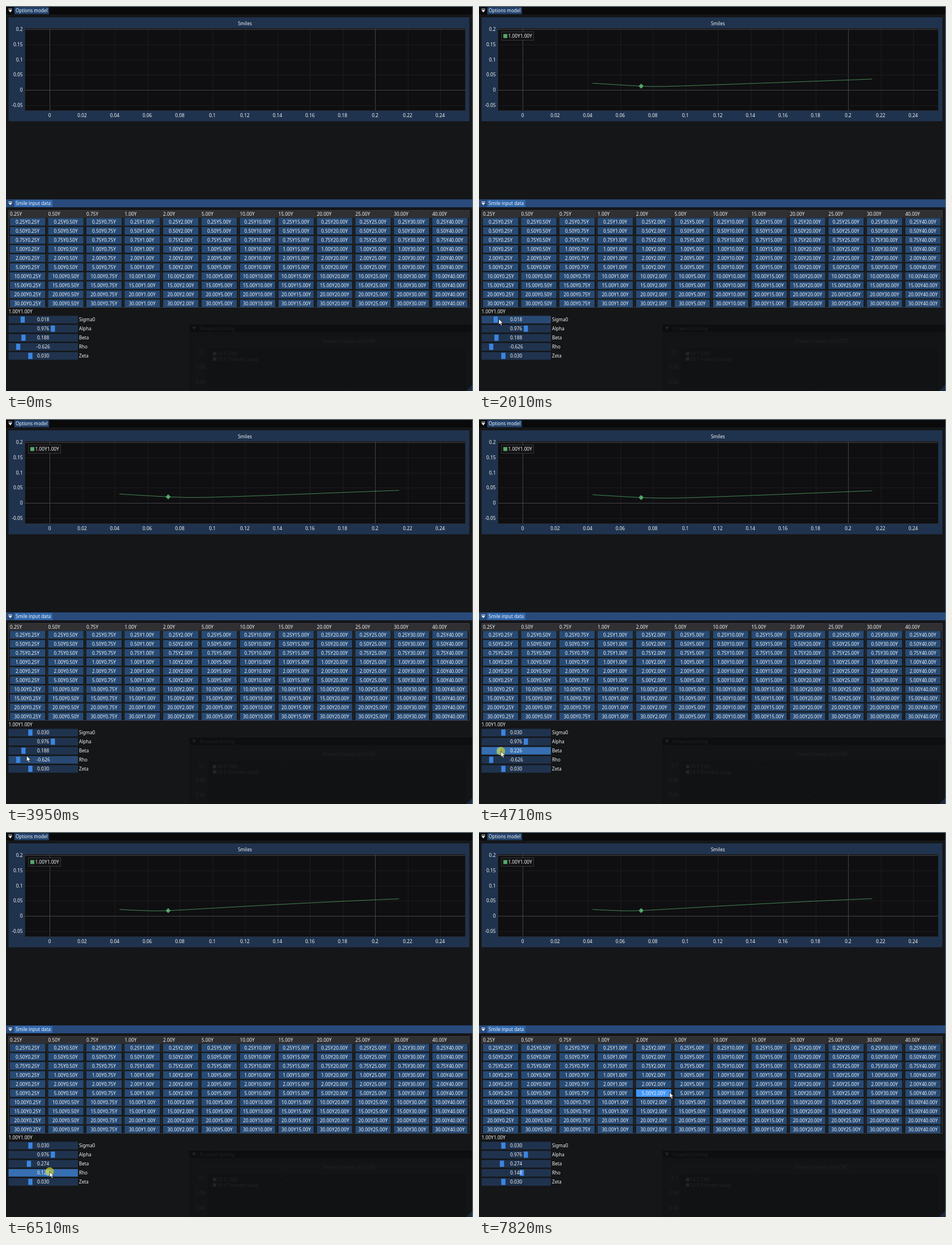
Recreate the animation shown at these times as an HTML page with a canvas. Size 825 by 679 pixels, loop 8 s.

```html
<!DOCTYPE html>
<html lang="en">
<head>
<meta charset="utf-8">
<title>Options model</title>
<style>
html, body { margin: 0; width: 100%; height: 100%; overflow: hidden; background: #151618; }
canvas { display: block; width: 825px; height: 679px; }
</style>
</head>
<body>
<canvas id="stage" width="825" height="679"></canvas>
<script>
const ctx = document.getElementById('stage').getContext('2d');
const LOOP = 8000, STEP = 70;
const TENORS = ['0.25', '0.50', '0.75', '1.00', '2.00', '5.00', '10.00', '15.00', '20.00', '25.00', '30.00', '40.00'];
const EXPIRIES = TENORS.filter(n => n !== '25.00' && n !== '40.00');
const WHITE = '#f2f3f4', GREEN = '#55a868', FRAME = '#20334e';
const ROW = 16, CELL_W = 62.3, BAR_H = 13.4;

// The screen refreshes every STEP ms, counted from each of these times.
const STARTS = [0, 120, 2230, 3460, 5120, 5950, 7200];

// Slider value = (thumb x - zero) / scale; press..release is its drag.
const SLIDERS = [
  { name: 'Sigma0', init: 0.018, zero: 9.2, scale: 1128, press: 2230, release: 3460 },
  { name: 'Alpha', init: 0.976, zero: 9.2, scale: 75.4 },
  { name: 'Beta', init: 0.188, zero: 9.6, scale: 113, press: 4300, release: 5120 },
  { name: 'Rho', init: -0.626, zero: 65.4, scale: 70, press: 5740, release: 7200 },
  { name: 'Zeta', init: 0.03, zero: 9.2, scale: 1128 }
];
const [SIGMA, , BETA, RHO] = SLIDERS;
const CLICK = { press: 1310, release: 1450 };

const mix = (a, b, k) => a + (b - a) * k;
const mixAll = (a, b, k) => a.map((v, i) => mix(v, b[i], k));
const smooth = k => k * k * (3 - 2 * k);
const easeOut = k => 1 - (1 - k) ** 2;
const within = (t, r, delay = 0) => t >= r.press + delay && t < r.release;
const thumbX = (s, value) => s.zero + value * s.scale;

// Pointer moves: begin, end, x, y, easing
const ENTRY = [753, 671];
const MOVES = [
  [120, 960, 250, 428, easeOut],
  [1450, 1730, 40, 557, smooth],
  [1800, 2010, 35, 552, smooth],
  [2230, 2990, thumbX(SIGMA, 0.03), 555, smooth],
  [3460, 3880, 37, 595, smooth],
  [3880, 4230, thumbX(BETA, 0.188), 586, smooth],
  [4455, 4727, thumbX(BETA, 0.274), 586, smooth],
  [5190, 5600, thumbX(RHO, -0.626), 600, smooth],
  [5750, 6571, 78, 599, smooth],
  [6650, 6930, thumbX(RHO, 0.148), 598, smooth],
  [7200, 7760, 336.5, 459, smooth]
];

// Smile shapes: left slope, right slope, centre, roundness, base height, bow
const SMILES = {
  low: [0.066, 0.0365, 305, 25, 143.2, 0],
  sigma: [0.067, 0.0395, 320, 45, 140.7, 0],
  beta: [0.067, 0.041, 314, 41, 143.1, 0],
  rho: [0.06, 0.0535, 262, 30, 140.7, 5]
};

function snap(t) {
  const s = STARTS.filter(v => v <= t).pop();
  return s ? s + Math.floor((t - s) / STEP) * STEP : 0;
}

function pointer(t) {
  if (t < MOVES[0][0]) return null;
  let pos = ENTRY;
  for (const [begin, end, x, y, ease] of MOVES) {
    if (t < begin) break;
    pos = mixAll(pos, [x, y], ease(Math.min(1, (t - begin) / (end - begin))));
  }
  return pos;
}

function sliderValue(s, t) {
  if (!s.press || t < s.press + STEP) return s.init;
  return (pointer(Math.min(t, s.release) - STEP)[0] - s.zero) / s.scale;
}

function box(x, y, w, h, fill) {
  ctx.fillStyle = fill;
  ctx.fillRect(x, y, w, h);
}

function outline(x, y, w, h, color) {
  ctx.strokeStyle = color;
  ctx.lineWidth = 1;
  ctx.strokeRect(x, y, w, h);
}

function poly(points, fill) {
  ctx.beginPath();
  points.forEach(p => ctx.lineTo(p[0], p[1]));
  ctx.closePath();
  ctx.fillStyle = fill;
  ctx.fill();
}

function text(str, x, y, align = 'left', color = WHITE) {
  const size = /^[-\d]/.test(str) ? 8.3 : 8.15;
  ctx.font = size + 'px "Noto Sans", "Open Sans", sans-serif';
  ctx.textAlign = align;
  ctx.fillStyle = color;
  ctx.fillText(str, x, y + 3);
}

function titleBar(y, label, width, bar, tab) {
  box(0, y, 824, 14, bar);
  ctx.beginPath();
  ctx.roundRect(14.5, y + 1, width, 12.5, [2, 2, 0, 0]);
  ctx.fillStyle = tab;
  ctx.fill();
  box(4.2, y + 3.8, 6.8, 1, WHITE);
  poly([[4.2, y + 6], [11, y + 6], [7.6, y + 10.3]], WHITE);
  text(label, 17, y + 7.3);
}

function drawPlot() {
  box(4.5, 20, 814, 183.3, FRAME);
  text('Smiles', 422, 31, 'center');
  box(33, 39.5, 779, 145, '#0f0f11');
  for (let i = 0; i <= 12; i++) {
    const x = 77 + i * 57.5;
    box(Math.round(x), 40, 1, 144, i % 10 ? '#1c1c1e' : '#454547');
    text(String(+(i * 0.02).toFixed(2)), x, 193, 'center');
  }
  for (let i = -1; i <= 4; i++) {
    const y = 148 - i * 26.75;
    box(33, Math.round(y), 779, 1, i % 4 ? '#1c1c1e' : '#454547');
    text(String(+(i * 0.05).toFixed(2)), 29.5, y, 'right');
  }
  outline(33.5, 39.5, 778, 145, '#25272c');
}

function drawSmile(t) {
  let p = mixAll(SMILES.low, SMILES.sigma, (sliderValue(SIGMA, t) - 0.018) / 0.012);
  p = mixAll(p, SMILES.beta, (sliderValue(BETA, t) - 0.188) / 0.086);
  p = mixAll(p, SMILES.rho, (sliderValue(RHO, t) + 0.626) / 0.774);
  const [l, r, m, s, base, bow] = p;
  const markX = 286.5, endX = 694.5;
  const height = x => {
    const w = Math.max(0, (x - markX) / (endX - markX));
    return base - (r - l) / 2 * (x - m) - (r + l) / 2 * Math.hypot(x - m, s) - bow * w * (1 - w);
  };

  ctx.beginPath();
  for (let x = 200.5; x <= endX; x += 6.5) ctx.lineTo(x, height(x));
  ctx.strokeStyle = GREEN;
  ctx.lineWidth = 0.8;
  ctx.stroke();
  const y = height(markX), d = 4.4;
  poly([[markX - d, y], [markX, y - d], [markX + d, y], [markX, y + d]], GREEN);

  box(39.5, 45.5, 57, 15, '#121214');
  outline(39.5, 45.5, 57, 15, '#36363b');
  box(43, 49.5, 7, 7, GREEN);
  text('1.00Y1.00Y', 51.5, 53);
}

function drawTable(hover, t) {
  const colX = c => 7 + c * 67.5 + Math.max(0, c - 3) * 0.45;
  box(4.5, 360.5, 814, 12.8, '#303033');
  EXPIRIES.forEach((e, r) => {
    if (r % 2 === 0) box(4.5, 373 + r * ROW, 814, ROW, 'rgba(255,255,255,.03)');
  });
  outline(4.5, 360.5, 814, 171, '#3c3c43');
  TENORS.forEach((tenor, c) => {
    const x = colX(c);
    if (c) box(Math.round(x - 3), 360.5, 1, 171, '#2b2b30');
    text(tenor + 'Y', x, 366.5);
    EXPIRIES.forEach((e, r) => {
      const y = 373.8 + r * ROW;
      const over = hover && hover[0] >= x && hover[0] < x + CELL_W && hover[1] >= y && hover[1] < y + BAR_H;
      box(x, y, CELL_W, BAR_H, !over ? '#274a74' : within(t, CLICK) ? '#0f87fa' : '#4296fa');
      text(e + 'Y' + tenor + 'Y', x + CELL_W / 2, y + 6.7, 'center');
    });
  });
}

function drawSliders(hover, t) {
  text('1.00Y1.00Y', 4.5, 539);
  SLIDERS.forEach((s, i) => {
    const y = 546.4 + i * ROW, value = sliderValue(s, t);
    const active = s.press && within(t, s);
    const over = hover && hover[0] < 127 && hover[1] >= y && hover[1] < y + BAR_H;
    box(4.5, y, 122.5, BAR_H, active ? '#376fb2' : over ? '#284973' : FRAME);
    box(thumbX(s, value) - 3.7, y + 1.2, 7.4, 10.9, active ? '#4296fa' : '#3d85e0');
    text(value.toFixed(3), 65.7, y + 6.7, 'center');
    text(s.name, 129, y + 6.7);
  });
}

// Faded window behind the lower right corner
function drawGhost() {
  const ink = '#222426';
  box(324, 562, 501, 117, '#121314');
  box(324, 562, 501, 13, '#0d0e0f');
  poly([[328.5, 565.5], [335.5, 565.5], [332, 571.5]], ink);
  text('Forward looking', 342, 568.5, 'left', ink);
  box(330, 583, 489, 96, '#131415');
  box(356, 603, 456, 76, '#111213');
  text('Forward swaps and CMS', 606, 591, 'center', ink);
  ['0.1', '0.08', '0.06'].forEach((s, i) => text(s, 352, 611 + i * 26, 'right', ink));
  ['10 Y CMS', '10 Y Forward swap'].forEach((s, i) => {
    box(365.5, 610 + i * 9.5, 6, 6, ink);
    text(s, 373, 613 + i * 9.7, 'left', ink);
  });
  ctx.beginPath();
  ctx.moveTo(484, 606);
  ctx.lineTo(606, 679);
  ctx.strokeStyle = '#161819';
  ctx.lineWidth = 1;
  ctx.stroke();
  poly([[824, 668], [824, 679], [813, 679]], '#1b2a3e');
}

function drawPointer([x, y], t) {
  const ring = within(t, CLICK, STEP) || SLIDERS.some(s => s.press && within(t, s));
  if (ring) {
    ctx.beginPath();
    ctx.arc(x, y - 0.2, 7.5, 0, Math.PI * 2);
    ctx.fillStyle = 'rgba(205,210,40,.68)';
    ctx.fill();
  }
  const shape = [[0, 0], [0, 10], [2.3, 7.9], [3.9, 11.6], [5.7, 10.8], [4.1, 7.2], [7.2, 7.2]];
  poly(shape.map(p => [x + p[0], y + p[1]]), '#fff');
  ctx.strokeStyle = '#111';
  ctx.lineWidth = 0.7;
  ctx.stroke();
}

function draw(time) {
  const t = snap(time);
  const pos = pointer(t);
  const dragging = SLIDERS.some(s => s.press && within(t, s));
  const hover = dragging ? null : pointer(t - STEP);
  box(0, 0, 825, 679, '#151618');
  titleBar(1, 'Options model', 61.5, '#0a0a0b', '#23436d');
  drawPlot();
  if (t >= CLICK.release) drawSmile(t);
  titleBar(341, 'Smile input data', 67.5, '#294a7a', '#3369ad');
  drawTable(hover, t);
  drawSliders(hover, t);
  drawGhost();
  box(0, 0, 825, 1.2, '#84949d');
  box(823.8, 0, 1.2, 679, '#65747e');
  if (pos) drawPointer(pos, t);
}

let begin;
function tick(now) {
  if (begin === undefined) begin = now;
  draw((now - begin) % LOOP);
  requestAnimationFrame(tick);
}
requestAnimationFrame(tick);
</script>
</body>
</html>
```
